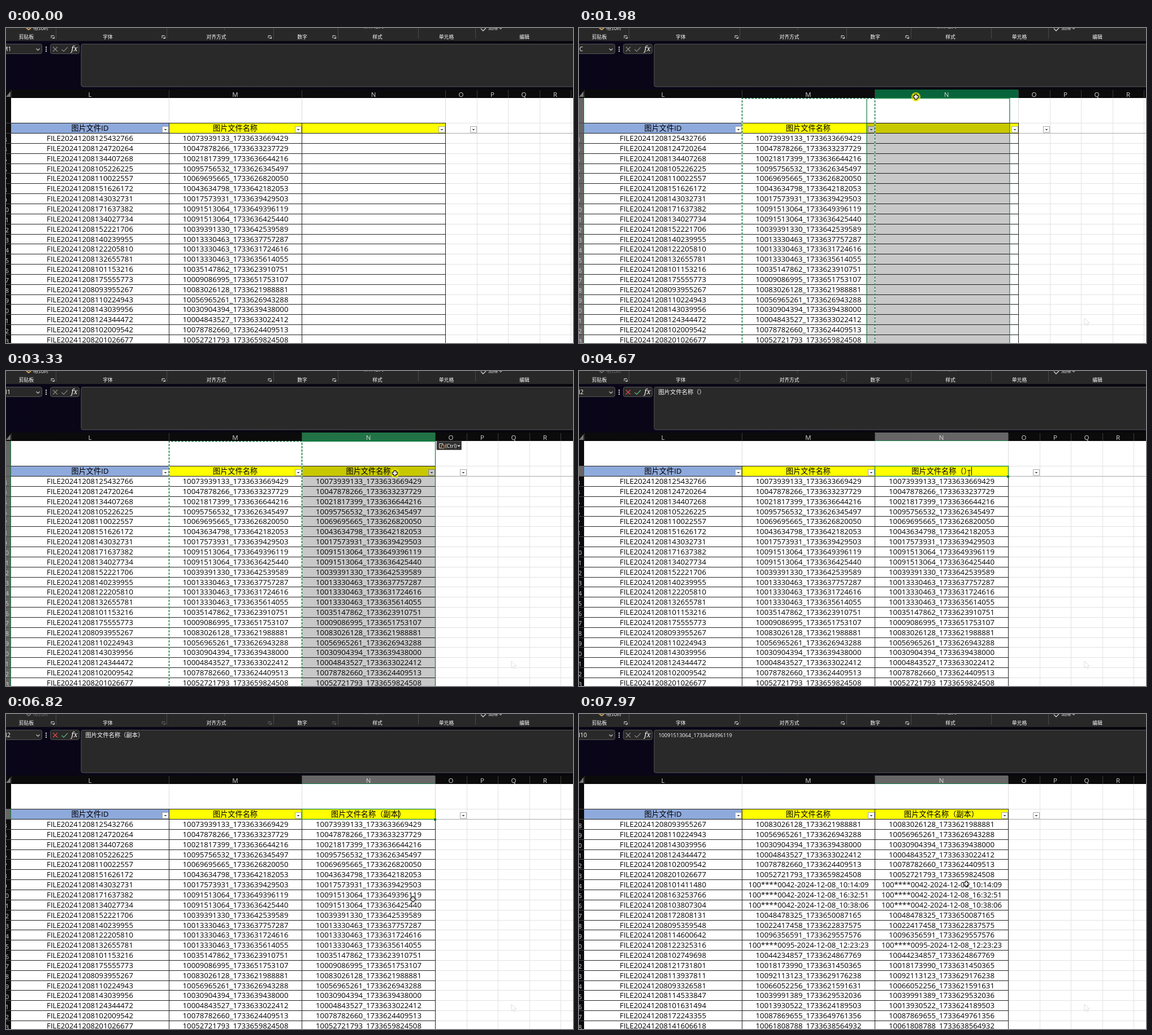
An HTML page with a canvas that plays this animation: 1003x558 px, repeating every 8000 ms.

```html
<!DOCTYPE html>
<html lang="zh-CN">
<head>
<meta charset="utf-8">
<title>Copying a column</title>
<style>
html, body { margin: 0; width: 100%; height: 100%; overflow: hidden; background: #000; }
canvas { display: block; }
</style>
</head>
<body>
<canvas id="stage" width="1003" height="558"></canvas>
<script>
const W = 1003, H = 558, LOOP = 8000;
const TOP = 186, ROW = 17.85, VISIBLE = 21;
const FONT = '"Open Sans", "Noto Sans CJK SC", "Noto Sans CJK JP", "Noto Sans CJK", sans-serif';
const GREEN = '#107c41', BASE = '图片文件名称';
const c = document.getElementById('stage').getContext('2d');

const ids = `125432766 124720264 134407268 105226225 110022557 151626172 143032731 171637382 134027734
152221706 140239955 122205810 132655781 101153216 175555773 093955267 110224943 143039956 124344472
102009542 201026677 101411480 163253766 103807304 172808131 095359548 114600642 122325316 102749698
121731801 113937811 093326581 114533847 101631494 172243355 141606618`.split(/\s+/);
// Eight digits end a timestamp; six digits are a clock time.
const stamps = `33669429 33237729 36644216 26345497 26820050 42182053 39429503 49396119 36425440
42539589 37757287 31724616 35614055 23910751 51753107 21988881 26943288 39438000 33022412
24409513 59824508 101409 163251 103806 50087165 22837575 29557576 122323 24867769
31450365 29176238 21591631 29532036 24189503 49761356 38564932`.split(/\s+/);
const sameOwner = { 8: 7, 11: 10, 12: 10 };

function fileName(i) {
  const s = stamps[i];
  if (s.length === 6) {
    return `100****${i < 27 ? '0042' : '0095'}-2024-12-08_${s.match(/../g).join(':')}`;
  }
  const owner = sameOwner[i] ?? i;
  return '100' + String((owner + 1) * 73939133 % 1e8).padStart(8, '0') + '_17336' + s;
}
const names = ids.map((_, i) => fileName(i));

// Times of the actions, in ms
const COPY = 1340, PRESS_N = 1860, PASTE = 2450, PICK = 3360, EDIT = 3560,
      BRACKETS = 4520, LEFT_KEY = 5150, COMPOSE = 5520, COMMIT = 6200, LEAVE = 6870;
const scrolls = [7080, 7150, 7220, 7290, 7520];
const clicks = [[690, 1020], [PRESS_N, 2140], [3310, EDIT], [6850, 6960]];
const selections = [
  [0, [288, 124, 523, 168]],
  [690, [288, 124, 523, 570]],
  [PRESS_N, [523, 124, 777, 570]],
  [PASTE, [523, 124, 759, 570]],
  [PICK, [523, 168, 759, 186]],
  [LEAVE, [523, TOP + 7 * ROW, 759, TOP + 8 * ROW]]
];
const mousePath = [
  [30, 897, 519], [200, 745, 360], [340, 608, 245], [530, 435, 110], [1480, 435, 110],
  [1840, 596, 122], [2600, 596, 122], [3020, 688, 181], [EDIT, 688, 181], [3920, 690, 181],
  [6650, 690, 181], [6810, 720, 328], [7050, 720, 328], [7250, 711, 317], [7870, 711, 317],
  [7970, 685, 301]
];

const between = (t, a, b) => t >= a && t < b;
const mix = (a, b, p) => a + (b - a) * p;

function box(x, y, w, h, fill, stroke, r = 0) {
  c.beginPath();
  c.roundRect(x, y, w, h, r);
  if (fill) { c.fillStyle = fill; c.fill(); }
  if (stroke) { c.strokeStyle = stroke; c.lineWidth = 1; c.stroke(); }
}
function line(color, width, ...p) {
  c.beginPath();
  for (let i = 0; i < p.length; i += 2) c.lineTo(p[i], p[i + 1]);
  c.strokeStyle = color;
  c.lineWidth = width;
  c.stroke();
}
const hLine = (x0, x1, y, color) => line(color, 1, x0, Math.round(y) + .5, x1, Math.round(y) + .5);
const vLine = (x, y0, y1, color) => line(color, 1, x + .5, y0, x + .5, y1);
function text(s, x, y, size, color, align = 'center', style = '', family = FONT) {
  c.font = `${style} ${size}px ${family}`;
  c.textAlign = align;
  c.fillStyle = color;
  c.fillText(s, x, y);
}

function mouseAt(t) {
  const k = mousePath.findIndex(p => p[0] > t);
  if (k < 0) return mousePath.at(-1).slice(1);
  if (!k) return mousePath[0].slice(1);
  const [a, b] = [mousePath[k - 1], mousePath[k]];
  const p = (t - a[0]) / (b[0] - a[0]);
  return [mix(a[1], b[1], p), mix(a[2], b[2], p)];
}

function selectionAt(t) {
  const k = selections.findLastIndex(s => s[0] <= t);
  if (!k) return null;
  const p = Math.min(1, (t - selections[k][0]) / 200);
  const eased = 1 - (1 - p) ** 3;
  return selections[k][1].map((v, i) => mix(selections[k - 1][1][i], v, eased));
}

function headerTitle(t) {
  if (t < PASTE) return ['', ''];
  if (t < BRACKETS) return [BASE, ''];
  const typed = t >= COMMIT ? '副本'
    : t >= COMPOSE ? 'fuben'.slice(0, 1 + Math.floor((t - COMPOSE) / 95)) : '';
  const before = BASE + '（' + typed;
  return t < LEFT_KEY ? [before + '）', ''] : [before, '）'];
}

function drawRibbon(editing) {
  const dim = editing ? '#686868' : '#e6e6e6';
  box(0, 0, W, 23, '#282828');
  [['剪贴板', 36], ['字体', 180], ['对齐方式', 372], ['数字', 524], ['样式', 657],
   ['单元格', 779], ['编辑', 917]].forEach(([s, x]) => text(s, x, 18.5, 8.8, '#fff'));
  [88, 284, 473, 587, 729, 830].forEach(x => vLine(x, 0, 19, '#484848'));
  vLine(386, 0, 4, '#484848');
  text('格式刷', 48, 3, 8.8, dim, 'left');
  text('条件格式', 650, 0, 8.8, dim);
  text('清除', 853, 3, 8.8, '#e6e6e6', 'left');
  line('#e6e6e6', 1, 873, 0, 875, 2, 877, 0);
  line(editing ? '#686868' : '#d6a45c', 2, 36, 0, 40, 3, 44, 0);
  line('#d0d0d0', 1.3, 840, 1, 844, 5, 849, 0);
  [83, 279, 467, 581].forEach((x, i) => {
    const color = i ? dim : '#e6e6e6';
    line(color, .9, x - 3, 18, x - 3, 13.5, x + 2, 13.5);
    line(color, .9, x - 1, 15.5, x + 2, 18.5);
    line(color, .9, x + 2.5, 15, x + 2.5, 18.5, x - 1, 18.5);
  });
}

function drawFormulaBar(t, editing, title) {
  const bg = c.createLinearGradient(0, 0, W, 0);
  bg.addColorStop(0, '#0a0619');
  bg.addColorStop(1, '#08070d');
  box(0, 23, W, 87, bg);
  box(-5, 28.5, 68.5, 17, '#292929', '#555', 3);
  box(78.5, 28.5, 51, 17, '#292929', '#555', 3);
  box(133, 28.5, 880, 75.5, '#292929', '#555', 3);
  line('#ccc', 1.1, 53.5, 36.5, 56.5, 39.5, 59.5, 36.5);
  [34, 37.5, 41].forEach(y => box(70, y - 1, 2, 2, '#ddd'));
  line(editing ? '#e04848' : '#858585', 1.2, 83, 33.5, 91, 41.5);
  line(editing ? '#e04848' : '#858585', 1.2, 91, 33.5, 83, 41.5);
  line(editing ? '#5bb974' : '#858585', 1.2, 98.5, 38, 102, 41.5, 109, 34);
  text('fx', 121, 41, 13, '#fff', 'center', 'italic', '"Noto Serif", serif');

  if (between(t, 690, 1020) || between(t, PRESS_N, 2130)) {
    text('1048576R x 1C', 7, 41, 10, '#fff', 'right');
  } else {
    const cell = t < PRESS_N ? 'M1' : t < PICK ? 'N1' : t < LEAVE ? 'N2' : 'N10';
    text(cell, -6, 41, 10.5, '#fff', 'left');
  }
  if (t >= LEAVE) text(names[7], 140.5, 41, 9.2, '#fff', 'left');
  else if (t >= PICK) text(title, 140.5, 41, 10.3, '#fff', 'left');
}

function filterButton(right) {
  box(right - 11.5, 174.5, 11, 10.5, '#fff', '#a8a8a8');
  c.beginPath();
  c.moveTo(right - 8.5, 179);
  c.lineTo(right - 3.5, 179);
  c.lineTo(right - 6, 181.5);
  c.fillStyle = '#444';
  c.fill();
}

function drawSheet(t, nRight, editing, [before, after]) {
  const first = 3 * scrolls.filter(s => t >= s).length;
  const cols = [0, 1, 2, 3, 4].map(i => Math.round(nRight + 55.5 * i));
  box(9, 124, W, H, '#fff');
  cols.slice(1).forEach(x => vLine(x, 124, H, '#e3e3e3'));
  [288, 523, nRight].forEach(x => vLine(x, 124, 168, '#dcdcdc'));
  hLine(nRight, W, 168, '#e3e3e3');

  box(9, 168, 279, 18, '#8ea9db');
  box(288, 168, nRight - 288, 18, '#ff0');
  hLine(9, nRight, 168, '#222');
  for (let i = 0; i < VISIBLE; i++) {
    const y = TOP + i * ROW;
    hLine(9, nRight, y, '#222');
    hLine(nRight, W, y, i ? '#e3e3e3' : '#aaa');
    text('FILE20241208' + ids[first + i], 148.5, y + 14, 13.2, '#000');
    text(names[first + i], 406, y + 14, 13.2, '#000');
    if (t >= PASTE) text(names[first + i], 641.5, y + 14, 13.2, '#000');
  }
  [288, 523, nRight].forEach(x => vLine(x, 168, H, '#222'));

  text('图片文件ID', 148.5, 182, 13.2, '#000');
  text(BASE, 405.5, 182, 13.2, '#000');
  text(before + after, 641, 182, 13.2, '#000');
  if (editing && !between(t, 4030, BRACKETS)) {
    const x = 641 - c.measureText(before + after).width / 2 + c.measureText(before).width;
    vLine(Math.round(x), 170, 185, '#000');
  }
  [288, 523, cols[1]].forEach(filterButton);
  if (!editing) filterButton(nRight);
  return first;
}

function drawSelection(t, rect, first, editing) {
  if (!rect) return;
  let [x0, y0, x1, y1] = rect;
  if (t >= LEAVE) { y0 -= first * ROW; y1 -= first * ROW; }
  c.save();
  c.beginPath();
  c.rect(9, first ? TOP : 124, W, H);
  c.clip();
  if (t < PICK) box(x0, 168, x1 - x0, H, 'rgba(0,0,0,.216)');
  c.strokeStyle = GREEN;
  c.lineWidth = editing || t < PICK ? 1.2 : 2;
  c.strokeRect(x0 + .5, y0 + .5, x1 - x0, y1 - y0);
  if (t >= PICK) box(x1 - 2, y1 - 1, 4, 4, GREEN);
  c.restore();
}

function drawAnts(t) {
  if (!between(t, COPY, EDIT)) return;
  line('#fff', 1.5, 288.5, H, 288.5, 124.5, 523.5, 124.5, 523.5, H);
  c.setLineDash([4, 2]);
  c.lineDashOffset = -Math.floor(t / 80) % 6;
  line(GREEN, 1.5, 288.5, H, 288.5, 124.5, 523.5, 124.5, 523.5, H);
  c.setLineDash([]);
}

function drawHeaders(t, nRight, first, mouseY) {
  const wholeColumn = between(t, 690, PICK);
  box(0, 109, W, 15, '#0b0b0b');
  box(0, 124, 9, H, '#0b0b0b');
  if (wholeColumn) {
    box(0, 124, 9, H, '#666');
    vLine(8, 124, H, GREEN);
  }
  const active = t < 690 ? null : t < PRESS_N ? [288, 523] : [523, nRight];
  if (active) {
    const fill = !wholeColumn ? '#666' : mouseY < 124 ? '#08643a' : '#217346';
    box(active[0], 109, active[1] - active[0], 15, fill);
    hLine(active[0], active[1], 123, GREEN);
  }
  const edges = [9, 288, 523, ...[0, 1, 2, 3, 4].map(i => Math.round(nRight + 55.5 * i))];
  edges.forEach((x, i) => {
    vLine(x, 110, 124, '#3b3b3b');
    if (i < 7) text('LMNOPQR'[i], (x + edges[i + 1]) / 2, 121.5, 11.5, '#d8d8d8');
  });
  c.beginPath();
  c.moveTo(8, 112);
  c.lineTo(8, 122);
  c.lineTo(0, 122);
  c.fillStyle = '#777';
  c.fill();

  hLine(0, 9, 168, '#444');
  if (between(t, PICK, LEAVE)) {
    box(0, 168, 9, 18, '#666');
    vLine(8, 168, 186, GREEN);
  }
  for (let i = 0; i < VISIBLE; i++) {
    const y = TOP + i * ROW;
    if (t >= LEAVE && first + i === 7) box(0, y, 9, ROW, '#666');
    hLine(0, 9, y, '#444');
    text(first + i + 3, -1.3, y + 15.5, 11, '#d0d0d0');
  }
}

function drawPasteButton() {
  box(762, 124.5, 43.5, 15, '#303030', '#555');
  box(766.5, 128.5, 6, 8, null, '#ddd');
  box(770, 131, 5, 6, '#303030', '#e0a050');
  text('(Ctrl)', 787, 136, 9, '#fff');
  line('#fff', 1.2, 799, 131.5, 801, 133.5, 803, 131.5);
}

function drawCandidates() {
  box(690.5, 188.5, 320, 31, '#f8f8f8', '#c8c8c8', 5);
  box(695, 193, 3, 21, '#3b78d8', null, 1);
  ['副本', '富本', '复本', '付', '副'].forEach((s, i) =>
    text(`${i + 1} ${s}`, 705 + i * 58, 209, 13, '#222', 'left'));
}

function arrow(x, y, fill, stroke) {
  c.beginPath();
  [[0, 0], [0, 12], [3, 9.5], [5, 13.5], [7, 12.5], [5, 9], [9, 8.5]]
    .forEach(([dx, dy]) => c.lineTo(x + dx, y + dy));
  c.closePath();
  c.fillStyle = fill;
  c.strokeStyle = stroke;
  c.lineWidth = 1;
  c.fill();
  c.stroke();
}
function plus(x, y) {
  for (const [color, w, r] of [['#000', 4.6, 5.3], ['#fff', 2.4, 4.2]]) {
    line(color, w, x - r, y, x + r, y);
    line(color, w, x, y - r, x, y + r);
  }
}

function drawMouse(t, x, y, editing) {
  if (t >= 30) arrow(894, 514, '#fff', '#ddd');
  if (clicks.some(([a, b]) => between(t, a, b))) {
    c.beginPath();
    c.arc(x, y, 8, 0, 7);
    c.fillStyle = 'rgba(240,235,0,.8)';
    c.fill();
  }
  if (t < 30 || between(t, 5100, 6650)) return;
  if (t < 450) arrow(x - 3, y - 5, '#fff', '#333');
  else if (t < PRESS_N) {
    line('#fff', 3.5, x, y - 4, x, y + 4);
    line('#000', 1.8, x, y - 4, x, y + 3);
    line('#000', 1.4, x - 2.5, y + .5, x, y + 3.5, x + 2.5, y + .5);
  } else if (editing && t < 5100) {
    line('#222', 1.1, x - 3, y - 5, x + 3, y - 5);
    line('#222', 1.1, x, y - 5, x, y + 5);
    line('#222', 1.1, x - 2, y + 5, x + 2, y + 5);
  } else plus(x, y);
}

function draw(t) {
  const editing = between(t, EDIT, LEAVE);
  const nRight = t < PASTE ? 777 : 759;
  const title = headerTitle(t);
  const [mx, my] = mouseAt(t);
  const first = drawSheet(t, nRight, editing, title);
  drawSelection(t, selectionAt(t), first, editing);
  drawAnts(t);
  drawRibbon(editing);
  drawFormulaBar(t, editing, title.join(''));
  drawHeaders(t, nRight, first, my);
  if (between(t, PASTE + 60, EDIT)) drawPasteButton();
  if (between(t, COMPOSE, COMMIT)) drawCandidates();
  drawMouse(t, mx, my, editing);
}

const start = performance.now();
function tick() {
  draw((performance.now() - start) % LOOP);
  requestAnimationFrame(tick);
}
tick();
</script>
</body>
</html>
```
